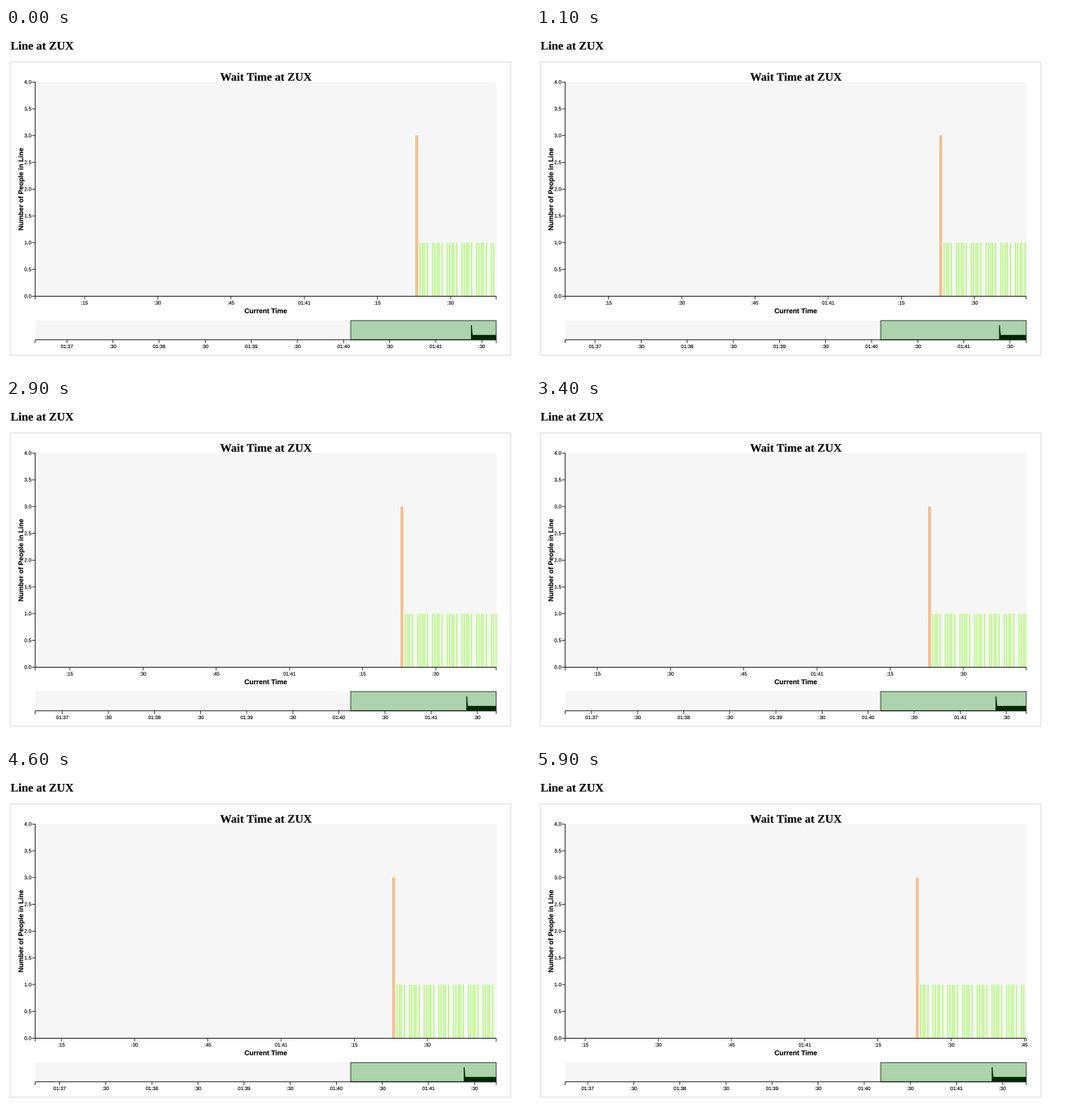
Animation, 640 px wide and 420 px high, one loop 6000 ms. Source, as a matplotlib script:

```python
import matplotlib.pyplot as plt
from matplotlib.animation import FuncAnimation
from matplotlib.collections import LineCollection
from matplotlib.patches import PathPatch, Polygon, Rectangle
from matplotlib.textpath import TextPath
from matplotlib.transforms import Affine2D

WIDTH, HEIGHT, DPI = 640, 420, 100
PX = 72 / DPI
LEFT, RIGHT = 35.7, 598.8
BASE, UNIT = 328.4, 65.55        # main chart: y of zero, pixels per person
MINI_BASE, MINI_UNIT = 381.8, 6  # overview chart
MAIN_SPEED, MINI_SPEED = 5.96, 1.877   # pixels per second
LEAD = 0.13
PANEL, INK = "#f6f6f6", "#111111"
ORANGE, GREEN = "#fba65a", "#a9fb64"

fig = plt.figure(figsize=(WIDTH / DPI, HEIGHT / DPI), dpi=DPI, facecolor="white")
ax = fig.add_axes([0, 0, 1, 1])
ax.set(xlim=(0, WIDTH), ylim=(HEIGHT, 0))
ax.axis("off")


def place(patch, x, y, angle=0):
    pose = Affine2D().scale(1, -1).rotate_deg(-angle).translate(x, y)
    patch.set_transform(pose + ax.transData)


def text(x, y, s, size, family="Liberation Sans", weight="normal",
         align=0.5, angle=0):
    """Text as outlines, so that it can sit between pixels; align 0 is left."""
    path = TextPath((0, 0), s, size=size, prop={"family": family, "weight": weight})
    bounds = path.get_extents()
    offset = Affine2D().translate(-bounds.x0 - align * bounds.width, 0)
    patch = PathPatch(path.transformed(offset), fc="black", ec="black",
                      lw=0.12 * PX, zorder=6, snap=False)
    ax.add_patch(patch)
    place(patch, x, y, angle)
    return patch


def box(x0, y0, x1, y1, **kw):
    ax.add_patch(Rectangle((x0, y0), x1 - x0, y1 - y0, **kw))


def lines(segments, color, width, z):
    group = LineCollection(segments, colors=color, linewidths=width * PX, zorder=z)
    group.set_snap(False)
    return ax.add_collection(group, autolim=False)


def clock(seconds):
    minute, second = divmod(seconds, 60)
    return f":{second}" if second else f"01:{minute}"


class TimeAxis:
    """Horizontal axis whose ticks slide left with time."""

    def __init__(self, y, x, seconds, step, count, speed):
        self.y, self.speed = y, speed
        self.starts = [x + i * step * speed for i in range(count)]
        self.labels = [text(0, 0, clock(seconds + i * step), 6.1)
                       for i in range(count)]
        lines([[(LEFT, y), (RIGHT, y)]], INK, 0.9, 5)
        lines([self.tick(LEFT), self.tick(RIGHT)], INK, 0.8, 5)
        self.ticks = lines([], INK, 0.75, 5)

    def tick(self, x):
        return [(x, self.y), (x, self.y + 4)]

    def move(self, elapsed):
        xs = [x - self.speed * elapsed for x in self.starts]
        for x, label in zip(xs, self.labels):
            place(label, x, self.y + 10.2)
            label.set_visible(x <= RIGHT)
        self.ticks.set_segments([self.tick(x) for x in xs if x <= RIGHT])


# Page and panels
box(5.1, 41.6, 616.7, 400.6, fc="none", ec="#dddddd", lw=PX, snap=False)
box(36, 66, 599, 328, fc=PANEL, ec="none")
box(36, 358, 599, 382, fc=PANEL, ec="none")
text(5.8, 26.4, "Line at ZUX", 14.3, "Liberation Serif", "bold", align=0)
text(317.5, 64.5, "Wait Time at ZUX", 14.1, "Liberation Serif", "bold")
text(317.3, 349.2, "Current Time", 8.4, weight="bold")
text(21, 197.2, "Number of People in Line", 8.4, weight="bold", angle=90)

# Vertical axis
lines([[(LEFT, 66), (LEFT, BASE)]], INK, 0.9, 5)
for half in range(9):
    y = BASE - half * UNIT / 2
    lines([[(31.7, y), (LEFT, y)]], INK, 0.8, 5)
    text(30.8, y + 2.1, f"{half / 2:.1f}", 6.3, align=1)

main_axis = TimeAxis(BASE, 96, 40 * 60 + 15, 15, 7, MAIN_SPEED)
mini_axis = TimeAxis(MINI_BASE, 74.4, 37 * 60, 30, 10, MINI_SPEED)

# Samples come in bursts, one every three seconds
TALL = [500.8, 502.5]
BURST = [0, 2.7, 5.8, 7.9, 11.7]
SHORT = [x for n in range(8) for x in (503 + 18 * n + dx for dx in BURST)
         if x > TALL[-1] + 2]
tall_bars = lines([], ORANGE, 1.2, 4)
short_bars = lines([], GREEN, 1.2, 4)

# Overview: brush and area
box(421, 358.2, RIGHT, MINI_BASE, fc="#acd3ac", ec="#1c2b1c", lw=0.8 * PX,
    zorder=3, snap=False)
area = ax.add_patch(Polygon([(0, 0), (1, 0), (1, 1)], fc="#002800", ec="none",
                            zorder=4, snap=False))


def bars(starts, value, shift):
    return [[(x - shift, BASE), (x - shift, BASE - value * UNIT)]
            for x in starts if x - shift < RIGHT]


def elapsed_at(frame):
    """The chart redraws in half-second bouts and rests at the end of each."""
    if frame < 4:
        return 0
    bout, step = divmod(frame - 4, 5)
    return (4 + 5 * bout + min(step, 3)) / 10 + LEAD


def draw(frame):
    elapsed = elapsed_at(frame)
    main_axis.move(elapsed)
    mini_axis.move(elapsed)
    shift = MAIN_SPEED * elapsed
    tall_bars.set_segments(bars(TALL, 3, shift))
    short_bars.set_segments(bars(SHORT, 1, shift))

    spike = 567.9 - MINI_SPEED * elapsed
    one, three = MINI_BASE - MINI_UNIT, MINI_BASE - 3 * MINI_UNIT
    area.set_xy([(spike, MINI_BASE), (spike, three), (spike + 1, three),
                 (spike + 2, one), (RIGHT, one), (RIGHT, MINI_BASE)])
    return []


anim = FuncAnimation(fig, draw, frames=60, interval=100, repeat=True,
                     repeat_delay=0, blit=False)
plt.show()
```
